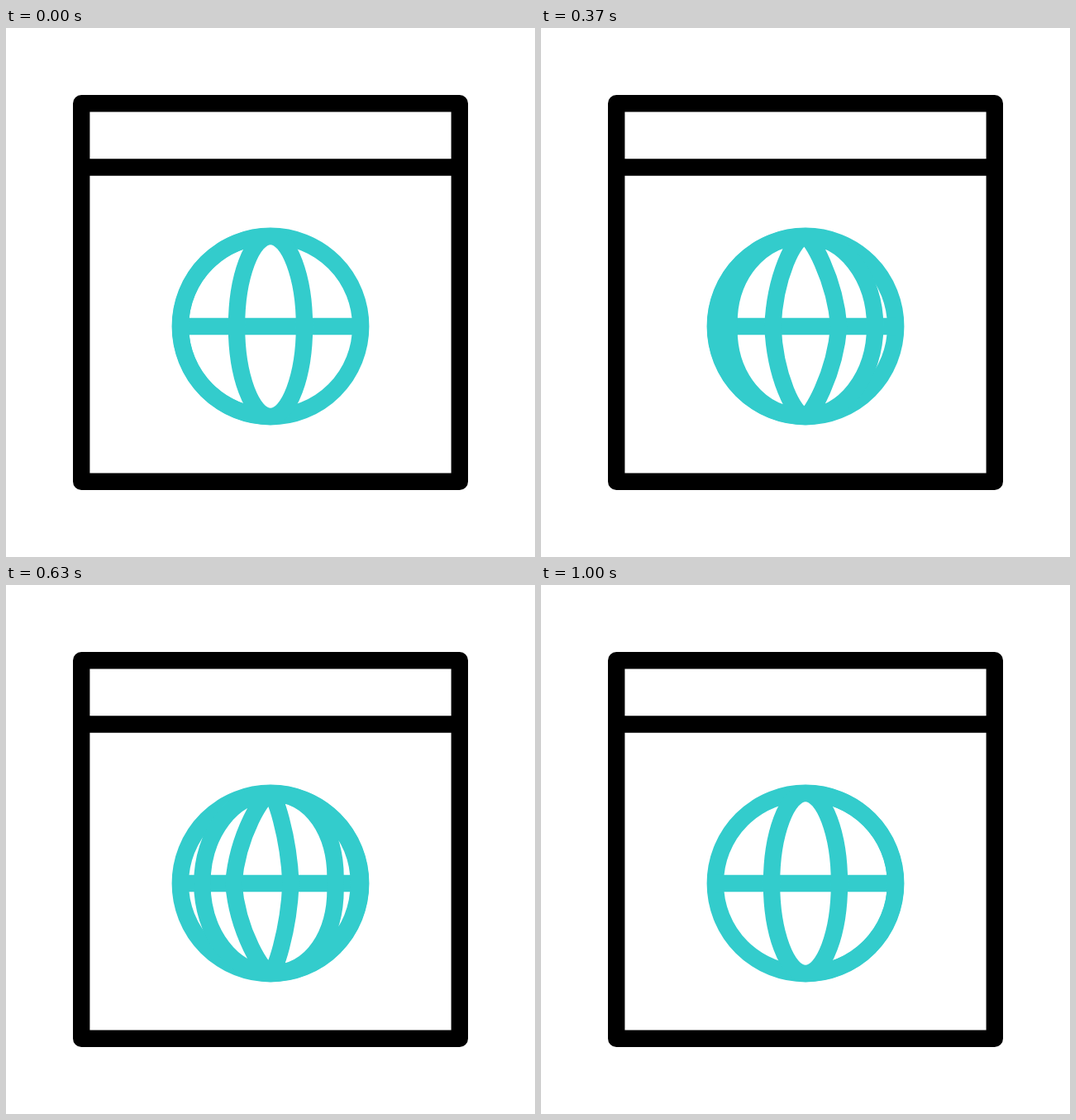
Recreate the animation shown at these times as an HTML page. Size 640 by 640 pixels, loop 1.63 s.

```html
<!DOCTYPE html>
<html lang="en">
<head>
<meta charset="utf-8">
<title>Browser globe</title>
<style>
  html, body { margin: 0; height: 100%; overflow: hidden; background: #fff; }
  svg { display: block; width: 100vw; height: 100vh; }
</style>
</head>
<body>
<svg viewBox="0 0 640 640" fill="none" stroke-width="20.4">
  <path d="M91.2 91.2H548.8V548.8H91.2ZM91.2 168.5H548.8" stroke="#000" stroke-linejoin="round"/>
  <clipPath id="disc"><circle r="119.4"/></clipPath>
  <g transform="translate(320 361)" stroke="#33cccc">
    <circle r="109.2"/>
    <path d="M-109 0H109"/>
    <g clip-path="url(#disc)"><path id="meridians"/></g>
  </g>
</svg>
<script>
const LOOP = 1630, R = 109, REST = 41, ROUND = 0.55, LEAN = 0.3;

// Each meridian crosses the globe once: from x, to x, [start, end] at the equator
// and, where it differs, at the poles. Times are in ticks of 1/30 s.
const sweeps = [
  [-REST, R, [1.3, 19.5], [6.5, 18.5]],
  [REST, R, [1.3, 17.3]],
  [-R, R, [4.7, 22.4], [4, 21]],
  [-R, R, [9, 26], [10, 27]],
  [-R, REST, [11, 29], [13, 23]],
  [-R, -REST, [12, 29]]
];

// Halfway between linear and sine easing.
function ease(tick, [start, end]) {
  const u = Math.min(1, Math.max(0, (tick - start) / (end - start)));
  return (u + (1 - Math.cos(Math.PI * u)) / 2) / 2;
}

function meridian(tick, [from, to, equator, pole = equator]) {
  const at = span => from + (to - from) * ease(tick, span);
  const x = at(equator), handle = at(pole) * ROUND, y = R * ROUND;
  const side = x + (handle - x * ROUND) * LEAN;
  return `M0 ${-R}C${handle} ${-R} ${side} ${-y} ${x} 0C${side} ${y} ${handle} ${R} 0 ${R}`;
}

const path = document.getElementById("meridians");

function draw() {
  const centis = Math.floor(performance.now() % LOOP / 10);
  const tick = Math.floor((centis + 0.5) * 0.3);
  path.setAttribute("d", sweeps.map(sweep => meridian(tick, sweep)).join(""));
  requestAnimationFrame(draw);
}
draw();
</script>
</body>
</html>
```
